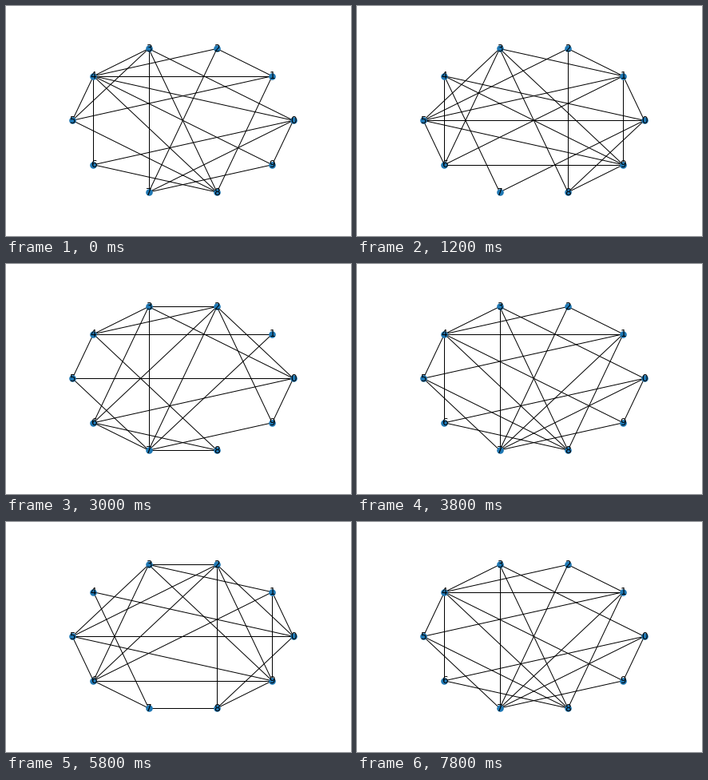
Write a matplotlib script that moves like this. It is 432x288 px and loops after 8 s.

```python
import itertools

import matplotlib.pyplot as plt
import numpy as np
from matplotlib.animation import FuncAnimation
from matplotlib.collections import LineCollection

NODES = 10
FRAMES = 40
INTERVAL = 200
PERIOD = 20      # frames for one full on/off cycle of an edge
PHASE_STEP = 2   # radians between consecutive edges
MARGIN = 1.21

angle = 2 * np.pi * np.arange(NODES) / NODES
pos = np.column_stack([np.cos(angle), np.sin(angle)])
pairs = np.array(list(itertools.combinations(range(NODES), 2)))
phase = PHASE_STEP * np.arange(len(pairs))

fig = plt.figure(figsize=(6, 4), dpi=72, facecolor="white")
ax = fig.add_axes([0.125, 0.125, 0.775, 0.755])
ax.set_axis_off()
ax.set_xlim(-MARGIN, MARGIN)
top = pos[:, 1].max() * MARGIN
ax.set_ylim(-top, top)

edges = LineCollection([], colors="black", linewidths=1, zorder=1)
ax.add_collection(edges, autolim=False)
ax.scatter(pos[:, 0], pos[:, 1], s=50, c="#1f78b4", linewidths=1.5, zorder=2)
for i, (x, y) in enumerate(pos):
    ax.text(x, y, str(i), fontsize=12, family="DejaVu Sans", color="black",
            ha="center", va="center", zorder=3)


def draw(frame):
    """Each edge is visible while its own sine wave is positive."""
    on = np.sin(2 * np.pi * frame / PERIOD - phase) > 0
    edges.set_segments(pos[pairs[on]])
    return [edges]


anim = FuncAnimation(fig, draw, frames=FRAMES, interval=INTERVAL,
                     init_func=lambda: draw(0), repeat=True, repeat_delay=0)
plt.show()
```
